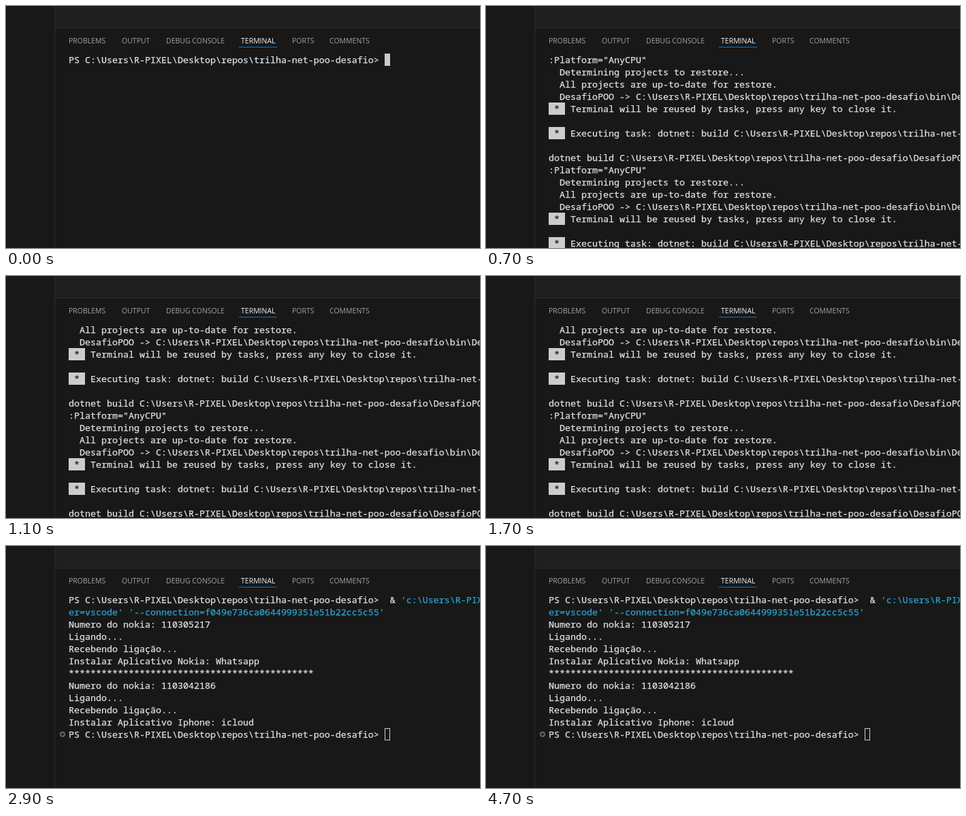
Write an HTML page that moves like this. It is 696x356 px and loops after 4800 ms.

```html
<!DOCTYPE html>
<html lang="en">
<head>
<meta charset="utf-8">
<title>Terminal</title>
<style>
  html, body { margin: 0; width: 100%; height: 100%; overflow: hidden; background: #181818; }
  body > * { position: absolute; box-sizing: border-box; }
  #editor { left: 71px; top: 0; width: 625px; height: 33px; background: #1f1f1f; border-bottom: 1px solid #2b2b2b; }
  #edge { left: 71px; top: 0; width: 1px; height: 356px; background: #2b2b2b; }
  .tab { top: 43px; font: 10.5px/16px "Open Sans", "Noto Sans", sans-serif; color: #a2a2a2; white-space: nowrap; }
  .active { color: #f0f0f0; }
  #underline { left: 342px; top: 60px; width: 56px; height: 1px; background: #0078d4; }
  #screen { left: 92px; top: 70px; width: 604px; height: 286px; margin: 0; overflow: hidden;
    font: 13.333px/18px "Noto Sans Mono", "DejaVu Sans Mono", monospace;
    font-variant-ligatures: none; -webkit-text-stroke: .25px; color: #e2e2e2; }
  #screen b { font-weight: normal; color: #29a4d2; }
  #screen i { display: inline-block; vertical-align: top; height: 18px; font-style: normal; }
  .star { background: #ccc; color: #181818; }
  .block, .hollow { width: 8px; }
  .block { background: #ccc; }
  .hollow { box-shadow: inset 0 0 0 1px #ccc; }
  #mark { left: 79px; top: 273px; width: 8px; height: 8px; border: 2px solid #666; border-radius: 50%; }
</style>
</head>
<body>
<div id="editor"></div>
<div id="edge"></div>
<div class="tab" style="left:92px">PROBLEMS</div>
<div class="tab" style="left:170px">OUTPUT</div>
<div class="tab" style="left:235px">DEBUG CONSOLE</div>
<div class="tab active" style="left:345px">TERMINAL</div>
<div class="tab" style="left:420px">PORTS</div>
<div class="tab" style="left:475px">COMMENTS</div>
<div id="underline"></div>
<pre id="screen"></pre>
<div id="mark"></div>
<script>
const LOOP = 4800, ROWS = 16;
const screen = document.getElementById('screen');
const mark = document.getElementById('mark');

const home = 'C:\\Users\\R-PIXEL';
const repo = home + '\\Desktop\\repos\\trilha-net-poo-desafio';
const prompt = `PS ${repo}&gt; `;
const star = '<i class="star"> * </i> ';
const block = '<i class="block"></i>';
const hollow = '<i class="hollow"></i>';

// Lines of one build; the task log repeats them
const build = [
  '',
  `dotnet build ${repo}\\DesafioPOO.csproj /property:Configuration=Debug`,
  ':Platform="AnyCPU"',
  '  Determining projects to restore...',
  '  All projects are up-to-date for restore.',
  `  DesafioPOO -&gt; ${repo}\\bin\\Debug\\DesafioPOO.dll`,
  star + 'Terminal will be reused by tasks, press any key to close it.',
  '',
  `${star}Executing task: dotnet: build ${repo}\\DesafioPOO.csproj`
];

const command = [
  `${prompt} &amp; <b>'${home.replace('C', 'c')}\\.vscode\\extensions'</b>`,
  "<b>er=vscode' '--connection=f049e736ca0644999351e51b22cc5c55'</b>"
];

const phone = (number, app) => [
  'Numero do nokia: ' + number,
  'Ligando...',
  'Recebendo ligação...',
  'Instalar Aplicativo ' + app
];

const output = [
  ...command,
  ...phone('110305217', 'Nokia: Whatsapp'),
  '*'.repeat(45),
  ...phone('1103042186', 'Iphone: icloud')
];

// Build log scrolled down by a number of lines
const log = shift => Array.from({ length: ROWS }, (_, row) => build[(row + shift + 9) % 9]);

const scenes = [
  [0, [prompt + block]],
  [100, log(-4)],
  [200, log(0)],
  [600, log(1)],
  [700, log(2)],
  [1000, log(3)],
  [1100, log(4)],
  [2000, [...command, hollow]],
  [2300, [...output, hollow]],
  [2400, [...output, prompt + hollow]]
];

let shown;
function draw() {
  const time = performance.now() % LOOP;
  const scene = scenes.filter(([start]) => start <= time).pop();
  if (scene !== shown) {
    shown = scene;
    screen.innerHTML = scene[1].join('\n');
    mark.hidden = scene[0] < 2400;
  }
  requestAnimationFrame(draw);
}
draw();
</script>
</body>
</html>
```
